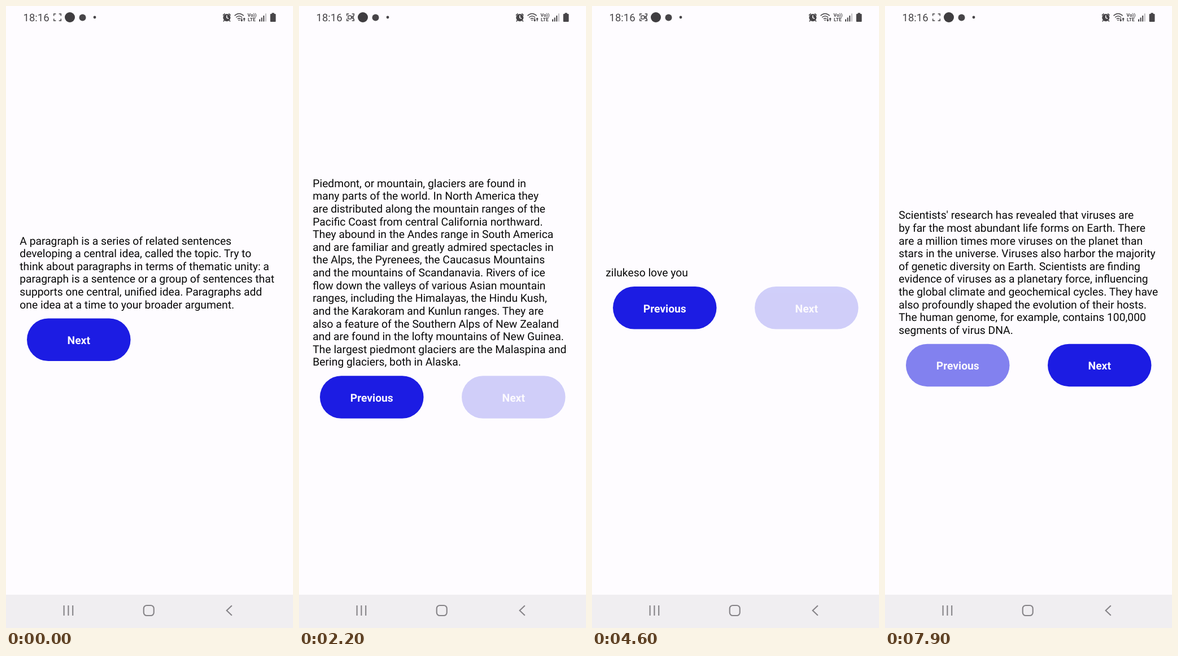
Recreate the animation shown at these times as an HTML page. Size 508x1102 px, loop 8 s.

```html
<!DOCTYPE html>
<html lang="en">
<head>
<meta charset="utf-8">
<title>Paged reader</title>
<style>
  html, body { margin: 0; width: 100%; height: 100%; overflow: hidden; background: #fefcff; }
  svg { display: block; width: 100%; height: 100%; font-family: Roboto, sans-serif; text-rendering: geometricPrecision; }
  .body { font-size: 19.3px; fill: #080808; }
  .button rect { fill: #1c1ce3; }
  .button text { font-size: 19.3px; font-weight: 700; fill: #f8f6fe; text-anchor: middle; }
  .status { fill: #474548; }
  .line { fill: none; stroke: #474548; stroke-width: 1.5; }
  .nav { fill: none; stroke: #858387; stroke-width: 2.1; }
</style>
</head>
<body>
<svg viewBox="0 0 508 1102" xmlns="http://www.w3.org/2000/svg">
  <rect width="508" height="1102" fill="#fefcff"/>

  <g class="status">
    <text x="30.5" y="27.4" font-size="18.5">18:16</text>
    <path class="line" d="M84.7 17.5V13.9H88.3M93.7 13.9H97.3V17.5M97.3 22.5V26.1H93.7M88.3 26.1H84.7V22.5"/>
    <g id="camera">
      <rect class="line" x="87" y="17.3" width="5.6" height="5.6" rx="1"/>
      <path class="line" stroke-width="1.2" d="M92.8 20L96 17.6V22.6Z"/>
    </g>
    <circle cx="113" cy="20" r="9" fill="#3f3d40"/>
    <circle cx="135.5" cy="20.5" r="6"/>
    <circle cx="157" cy="20" r="2.4"/>

    <circle cx="390.8" cy="20.6" r="6.6"/>
    <path class="line" stroke-width="2" d="M384 16.6L387.4 13.4M394.2 13.4L397.6 16.6M386.6 25.4L384.6 27.4M395 25.4L397 27.4"/>
    <path d="M390.8 16.6V20.8L394 22.4" fill="none" stroke="#fefcff" stroke-width="1.5"/>
    <path class="line" d="M404.5 17.3Q412.5 9.8 420.8 17.3M407.2 20.2Q412.7 15.2 418 20.2M409.8 23Q412.7 20.6 415.2 23"/>
    <path d="M410.6 24.4H414.4L412.5 26.6Z"/>
    <path class="line" stroke-width="1.2" d="M417.2 21.2V26.4M415.6 24.8L417.2 26.6L418.8 24.8M421.6 27V21.6M420 23.4L421.6 21.6L423.2 23.4"/>
    <g font-size="8.4" font-weight="700">
      <text x="427.6" y="19">Vo))</text>
      <text x="428" y="27.4">LTE</text>
    </g>
    <path d="M448 23.5h2v4h-2zM451.6 20.5h2v7h-2zM455.2 17h2v10.5h-2z"/>
    <path d="M458.8 13.3h2v14.2h-2z" fill="#bdbbbf"/>
    <path d="M470.4 12.3h4.4v1.7h1.7q1 0 1 1v11.9q0 1-1 1h-7.8q-1 0-1-1V15q0-1 1-1h1.7z"/>
  </g>

  <g id="copy" class="body"></g>
  <g id="previous" class="button">
    <rect width="183.5" height="75.6" rx="37.8"/>
    <text x="91.75" y="45.7">Previous</text>
  </g>
  <g id="next" class="button">
    <rect width="183.5" height="75.6" rx="37.8"/>
    <text x="91.75" y="45.7">Next</text>
  </g>

  <rect y="1043" width="508" height="59" fill="#f0eef1"/>
  <g class="nav">
    <path d="M102.6 1062V1080M110.4 1062V1080M118.2 1062V1080"/>
    <rect x="243.7" y="1062" width="18" height="18" rx="5.5"/>
    <path d="M399.8 1062.2L390.6 1071L399.8 1079.8"/>
  </g>
</svg>
<script>
const LOOP = 8000, TICK = 100, FADE = 250, PRESSED = 0.2;
const LINE = 22.61, LEFT = 24.3;
const BUTTON_X = { left: 37, right: 288 };

const intro = `A paragraph is a series of related sentences
developing a central idea, called the topic. Try to
think about paragraphs in terms of thematic unity: a
paragraph is a sentence or a group of sentences that
supports one central, unified idea. Paragraphs add
one idea at a time to your broader argument.`;

const glaciers = `Piedmont, or mountain, glaciers are found in
many parts of the world. In North America they
are distributed along the mountain ranges of the
Pacific Coast from central California northward.
They abound in the Andes range in South America
and are familiar and greatly admired spectacles in
the Alps, the Pyrenees, the Caucasus Mountains
and the mountains of Scandanavia. Rivers of ice
flow down the valleys of various Asian mountain
ranges, including the Himalayas, the Hindu Kush,
and the Karakoram and Kunlun ranges. They are
also a feature of the Southern Alps of New Zealand
and are found in the lofty mountains of New Guinea.
The largest piedmont glaciers are the Malaspina and
Bering glaciers, both in Alaska.`;

const viruses = `Scientists' research has revealed that viruses are
by far the most abundant life forms on Earth. There
are a million times more viruses on the planet than
stars in the universe. Viruses also harbor the majority
of genetic diversity on Earth. Scientists are finding
evidence of viruses as a planetary force, influencing
the global climate and geochemical cycles. They have
also profoundly shaped the evolution of their hosts.
The human genome, for example, contains 100,000
segments of virus DNA.`;

const pages = [intro, glaciers, viruses, 'zilukeso love you', viruses].map(text => text.split('\n'));

// Each tap: finger down, finger up, page turn, and how long the button fades back.
const taps = [
  { button: 'next', down: 800, up: 890, turn: 900, page: 1, fade: FADE },
  { button: 'next', down: 2200, up: 2390, turn: 2400, page: 2, fade: FADE },
  { button: 'next', down: 3100, up: 3250, turn: 3300, page: 3, fade: FADE },
  { button: 'next', down: 4600, up: 4700, turn: 4700, page: 4, fade: 0 },
  { button: 'previous', down: 6700, up: 6802, turn: 6800, page: 3, fade: FADE },
  { button: 'previous', down: 7700, up: 7784, turn: 7800, page: 2, fade: FADE }
];

const byId = id => document.getElementById(id);
const copy = byId('copy'), previous = byId('previous'), next = byId('next'), camera = byId('camera');

const easeInOut = u => u < 0.5 ? 2 * u * u : 1 - 2 * (1 - u) ** 2;

function opacityOf(button, t) {
  const tap = taps.findLast(tap => tap.button === button && tap.down <= t);
  if (!tap) return 1;
  if (t < tap.up) return PRESSED;
  const u = tap.fade ? Math.min(1, (t - tap.up) / tap.fade) : 1;
  return PRESSED + (1 - PRESSED) * easeInOut(u);
}

function showPage(index) {
  const lines = pages[index];
  const top = 485.6 + lines.length * LINE / 2;
  const lastBaseline = top - 17.8;
  copy.replaceChildren(...lines.map((line, i) => {
    const text = document.createElementNS('http://www.w3.org/2000/svg', 'text');
    text.setAttribute('x', LEFT);
    text.setAttribute('y', lastBaseline - (lines.length - 1 - i) * LINE);
    text.textContent = line;
    return text;
  }));
  const place = (button, x) => button.setAttribute('transform', `translate(${x} ${top})`);
  place(previous, BUTTON_X.left);
  place(next, index ? BUTTON_X.right : BUTTON_X.left);
  previous.style.display = index ? '' : 'none';
}

let shown = -1;

function render(t) {
  const turned = taps.findLast(tap => tap.turn <= t);
  const page = turned ? turned.page : 0;
  if (page !== shown) showPage(shown = page);
  previous.style.opacity = opacityOf('previous', t);
  next.style.opacity = opacityOf('next', t);
  const blink = t % 1000;
  camera.style.display = blink >= 200 && blink < 700 ? '' : 'none';
}

const start = performance.now();

function frame() {
  const elapsed = (performance.now() - start) % LOOP;
  render(Math.floor(elapsed / TICK) * TICK);
  requestAnimationFrame(frame);
}
frame();
</script>
</body>
</html>
```
